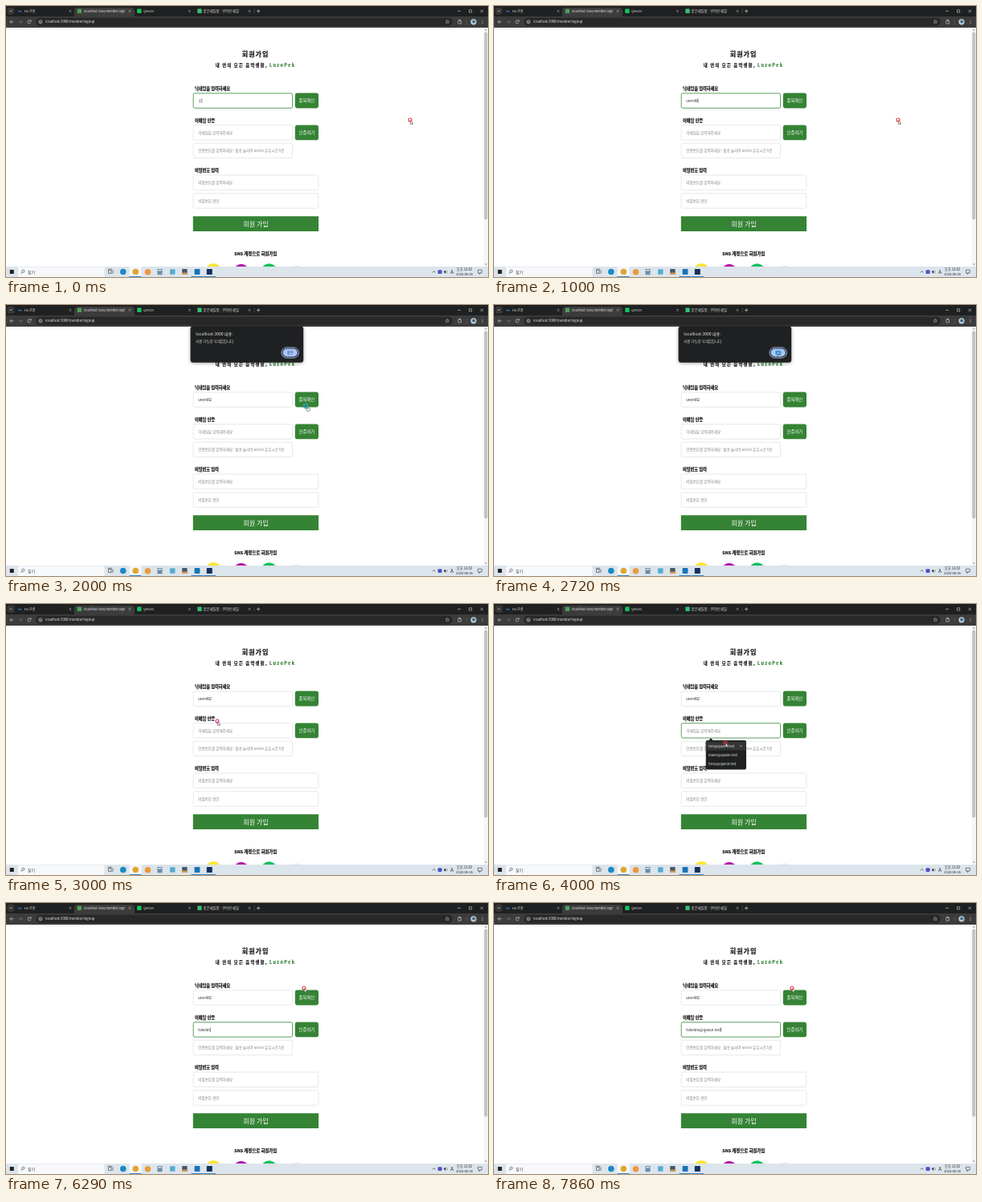
Recreate the animation shown at these times as an HTML page with a canvas. Size 600 px wide and 338 px high, loop 8000 ms.

```html
<!DOCTYPE html>
<html lang="ko">
<head>
<meta charset="utf-8">
<title>회원가입</title>
<style>
html, body { margin: 0; width: 100%; height: 100%; overflow: hidden; background: #fff; }
canvas { display: block; width: 600px; height: 338px; }
</style>
</head>
<body>
<canvas id="stage"></canvas>
<script>
const canvas = document.getElementById('stage');
const dpr = window.devicePixelRatio || 1;
canvas.width = Math.round(600 * dpr);
canvas.height = Math.round(338 * dpr);
const ctx = canvas.getContext('2d');

const LOOP = 8000, RATE = 7;
const FONT = '"Noto Sans CJK KR", "Noto Sans CJK", "Noto Sans", sans-serif';
const GREEN = '#358335', DARK = '#1f2021';
const NICK = 'uren482', MAIL = 'tukolme@qavun.test';

// All times below are ticks of 1/7 s.
const nickKeys = [1, 2, 3, 3, 5, 6, 9];
const mailKeys = [32, 33, 38, 38, 40, 42, 45, 47, 48, 49, 49, 50, 51, 51, 52, 52, 53, 54];
const clicks = [[12, 15], [19, 20], [23, 24]];
const path = [
  [0, 503, 142], [9, 503, 142], [10, 377, 126], [12, 376, 126], [14, 373, 126],
  [15, 373, 126], [18, 354, 60], [20, 354, 60], [21, 263, 146], [23, 272, 157],
  [25, 272, 157], [28, 288, 173], [29, 289, 173], [33, 365, 109], [35, 371, 106]
];

function box(x, y, w, h, r, fill, stroke, lw = 0.8) {
  ctx.beginPath();
  ctx.roundRect(x, y, w, h, r);
  if (fill) { ctx.fillStyle = fill; ctx.fill(); }
  if (stroke) { ctx.strokeStyle = stroke; ctx.lineWidth = lw; ctx.stroke(); }
}

function dot(x, y, r, fill) {
  ctx.beginPath();
  ctx.arc(x, y, r, 0, 7);
  ctx.fillStyle = fill;
  ctx.fill();
}

function ring(x, y, r, color, lw = 0.7, from = 0, to = 7) {
  ctx.beginPath();
  ctx.arc(x, y, r, from, to);
  ctx.strokeStyle = color;
  ctx.lineWidth = lw;
  ctx.stroke();
}

function line(color, lw, ...p) {
  ctx.beginPath();
  for (let i = 0; i < p.length; i += 2) ctx.lineTo(p[i], p[i + 1]);
  ctx.strokeStyle = color;
  ctx.lineWidth = lw;
  ctx.stroke();
}

function poly(fill, stroke, ...p) {
  ctx.beginPath();
  for (let i = 0; i < p.length; i += 2) ctx.lineTo(p[i], p[i + 1]);
  ctx.closePath();
  ctx.fillStyle = fill;
  ctx.fill();
  if (stroke) { ctx.strokeStyle = stroke; ctx.lineWidth = 0.5; ctx.stroke(); }
}

function text(s, x, y, size, color, { weight = 400, align = 'left', gap = 0 } = {}) {
  ctx.font = `${weight} ${size}px ${FONT}`;
  ctx.letterSpacing = gap + 'px';
  ctx.textAlign = align;
  ctx.textBaseline = 'middle';
  ctx.fillStyle = color;
  ctx.fillText(s, x, y);
  if (weight === 900) {
    ctx.strokeStyle = color;
    ctx.lineWidth = 0.2;
    ctx.strokeText(s, x, y);
  }
  return ctx.measureText(s).width;
}

function cross(x, y, r, color, lw = 0.6) {
  line(color, lw, x - r, y - r, x + r, y + r);
  line(color, lw, x + r, y - r, x - r, y + r);
}

function tabs() {
  box(0, 0, 600, 13.5, 0, DARK);
  box(1.5, 1.8, 9, 9, 3, '#373838');
  line('#ddd', 0.7, 4.7, 5.6, 6, 7, 7.3, 5.6);
  box(85, 2, 75, 14, [4, 4, 0, 0], '#3c3c3c');

  line('#3d7fc4', 1, 15, 5.5, 16.6, 7.6, 18, 5.8, 19.5, 8);
  text('H2 콘솔', 22.8, 6.5, 4.1, '#ddd');
  box(88.8, 3.8, 5.2, 5.2, 0.8, '#4aa35a');
  ctx.save();
  ctx.beginPath();
  ctx.rect(96, 0, 52.5, 13);
  ctx.clip();
  text('localhost:3000/member/signup', 97, 6.5, 3.85, '#eee');
  ctx.restore();
  box(163.2, 3.6, 5.4, 5.4, 0.8, '#16c35d');
  text('QAVUN', 171, 6.5, 3.9, '#ddd');
  box(238.3, 3.6, 5.4, 5.4, 0.8, '#35bd78');
  text('받은메일함 : 쿠아번 메일', 245.8, 6.5, 4.35, '#ddd');
  for (const x of [80, 154, 228.5, 303]) cross(x, 6.4, 1.3, '#ccc', 0.55);
  line('#555', 0.6, 309, 3.5, 309, 9.5);
  line('#ccc', 0.7, 312, 6.4, 316.4, 6.4);
  line('#ccc', 0.7, 314.2, 4.2, 314.2, 8.6);

  line('#ddd', 0.6, 562.3, 6.4, 566, 6.4);
  box(576.5, 4.8, 3.2, 3.2, 0.3, null, '#ddd', 0.6);
  cross(592.3, 6.4, 1.7, '#ddd');
}

function toolbar() {
  box(0, 13, 600, 14, 0, '#3c3c3c');
  box(37, 14.7, 519, 10.2, 5.1, '#282828');
  line('#ccc', 0.7, 9.5, 19.8, 4.9, 19.8);
  line('#ccc', 0.7, 7, 17.7, 4.9, 19.8, 7, 21.9);
  line('#777', 0.7, 15.6, 19.8, 20.2, 19.8);
  line('#777', 0.7, 18.1, 17.7, 20.2, 19.8, 18.1, 21.9);
  ring(29, 19.8, 2, '#ccc', 0.7, 0.3, 5.6);
  poly('#ccc', null, 29.4, 19.2, 31.5, 19.2, 31.5, 17.1);
  dot(42.9, 19.8, 3.4, '#3c3c3c');
  ring(42.9, 19.8, 1.8, '#ccc', 0.6);
  line('#ccc', 0.6, 42.9, 19.4, 42.9, 20.9);
  text('localhost:3000/member/signup', 49, 19.8, 4.2, '#eee');

  const star = [];
  for (let i = 0; i < 10; i++) {
    const a = i * Math.PI / 5 - Math.PI / 2, r = i % 2 ? 1.1 : 2.4;
    star.push(549.3 + r * Math.cos(a), 19.8 + r * Math.sin(a));
  }
  poly('#282828', '#ccc', ...star);
  box(562.8, 18.2, 3.8, 3.8, 0.6, null, '#ccc', 0.7);
  dot(564.7, 17.7, 0.9, '#ccc');
  line('#666', 0.6, 573.3, 17, 573.3, 23);
  dot(582, 19.8, 3.6, '#bfd0d8');
  dot(582.2, 19.6, 2, '#3e6f8e');
  for (const y of [18, 19.8, 21.6]) dot(593, y, 0.5, '#ccc');
}

function taskbar() {
  box(0, 325, 600, 13, 0, '#dce4ec');
  box(4.8, 329, 5, 5, 0, '#222');
  box(15, 325.6, 107.5, 12.4, 0, '#f6f8fa');
  ring(21.4, 330.7, 1.6, '#333', 0.6);
  line('#333', 0.7, 20.3, 332, 18.7, 333.8);
  text('찾기', 27, 331.6, 5, '#444');

  box(127.5, 329.6, 3.6, 3.9, 0, null, '#333', 0.6);
  line('#333', 0.6, 126.6, 328.3, 132.2, 328.3);
  line('#333', 0.6, 133, 329.4, 133, 333.8);

  box(153.5, 325, 15.5, 13, 0, '#f3f6f9');
  dot(145.8, 331.5, 3.8, '#1b8ac4');
  dot(161.3, 331.5, 3.8, '#e2a52f');
  dot(176.5, 331.8, 3.8, '#eb9a3c');
  box(188.5, 328, 6, 7.2, 0.6, '#6c8ba4');
  box(189.6, 329, 3.8, 1.5, 0, '#e4eef4');
  box(204, 328.2, 6.5, 6.5, 1, '#55acd0');
  box(219.2, 328, 6.4, 7, 0.8, '#45586a');
  box(219.2, 332.5, 6.4, 2.5, 0.6, '#d8994d');
  box(234.6, 328.1, 6.8, 6.8, 0.8, '#1673b8');
  box(249.8, 328, 7, 7, 0.5, '#16305e');
  for (const x of [153.5, 230.5, 246]) box(x, 337, 15, 1, 0, '#3684c8');

  line('#333', 0.7, 530.9, 332.4, 532.7, 330.6, 534.5, 332.4);
  box(537.6, 329.2, 5, 4.8, 1, '#4a50c8');
  poly('#333', null, 545, 330.8, 546, 330.8, 547.4, 329.5, 547.4, 333.9, 546, 332.6, 545, 332.6);
  ring(547.5, 331.7, 1.9, '#555', 0.5, -0.9, 0.9);
  text('A', 555, 331.8, 6, '#222', { weight: 500, align: 'center' });
  text('오후 12:02', 570.6, 328.6, 4.2, '#222', { align: 'center' });
  text('2024-08-26', 570.6, 334.7, 4, '#222', { align: 'center' });
  box(587.5, 329.2, 4.8, 3.9, 0.3, null, '#333', 0.6);
  line('#333', 0.6, 589, 333.2, 589, 334.6, 590.5, 333.2);
}

function field(y, w, hint, value = '', focus = false, caret = true) {
  box(233.2, y, w, 18.4, 1.8, '#fff', focus ? '#4d934d' : '#dedede', focus ? 0.9 : 0.7);
  const mid = y + 9.2;
  if (!value) return text(hint, 239.3, mid, 4.55, '#808080');
  const end = 239.3 + text(value, 239.3, mid, 4.4, '#222');
  if (focus && caret) line('#111', 0.5, end + 0.4, mid - 2.7, end + 0.4, mid + 2.7);
}

function button(y, label) {
  box(359.8, y, 29.2, 18.8, 2.8, GREEN);
  text(label, 374.4, y + 9.5, 5.4, '#fff', { align: 'center' });
}

const typed = (s, keys, n) => s.slice(0, keys.filter(k => k <= n).length);

function page(n) {
  box(0, 27, 600, 298, 0, '#fff');
  box(594.5, 27, 5.5, 298, 0, '#f6f6f6');
  box(595.3, 32.5, 3.9, 234, 1.9, '#c2c2c2');
  poly('#888', null, 595.9, 30.5, 598.7, 30.5, 597.3, 28.7);
  poly('#888', null, 595.9, 321.5, 598.7, 321.5, 597.3, 323.3);

  const heavy = { weight: 900 };
  text('회원가입', 293.7, 60, 8.1, '#111', { weight: 900, gap: 1 });
  text('내 안의 모든 음악생활,', 260.8, 74, 5.3, '#111', { weight: 900, gap: 1.2 });
  text('LuzoPek', 328, 74, 5.5, GREEN, { weight: 900, gap: 1.35 });

  text('닉네임을 입력하세요', 235, 103, 5.2, '#111', heavy);
  const nick = n ? typed(NICK, nickKeys, n) : 'ㅕ';
  field(108.9, 123.4, '', nick, n < 12);
  button(108.6, '중복확인');

  text('이메일 인증', 235, 142.8, 5.2, '#111', heavy);
  field(148.7, 123.4, '이메일을 입력해주세요', typed(MAIL, mailKeys, n), n >= 24, n !== 54);
  button(148.4, '인증하기');
  field(171.2, 123.4, '인증번호를 입력하세요 : 발송 눌러야 active 유효시간 5분');

  text('비밀번호 입력', 235, 205.3, 5.2, '#111', heavy);
  field(211, 155.7, '비밀번호를 입력하세요');
  field(233.8, 155.7, '비밀번호 확인');
  box(232.8, 262.3, 156.3, 18.7, 0, GREEN);
  text('회원 가입', 311, 271.8, 8.1, '#fff', { align: 'center' });

  text('SNS 계정으로 회원가입', 310.8, 308.5, 5.4, '#111', { weight: 900, align: 'center' });
  dot(258.2, 331, 10, '#fae333');
  dot(292.8, 331, 9.2, '#b51ba9');
  dot(327.5, 331, 9.8, '#10c15c');
  dot(362, 331, 7.8, '#eeeeee');
}

function dialog() {
  ctx.save();
  ctx.shadowColor = 'rgba(0,0,0,.35)';
  ctx.shadowBlur = 4 * dpr;
  ctx.shadowOffsetY = dpr;
  box(229.6, 26.3, 140.6, 45.5, 3.5, DARK);
  ctx.restore();
  text('localhost:3000 내용:', 236.2, 36, 5.1, '#eee');
  text('사용 가능한 닉네임입니다.', 236.2, 45.2, 4.45, '#ddd');
  box(343, 53, 21.4, 13, 6.5, null, '#a8c7fa', 0.9);
  box(344.6, 54.6, 18.2, 9.8, 4.9, '#a8c7fa');
  text('확인', 353.7, 59.5, 4.3, '#183a6b', { align: 'center' });
}

function suggestions() {
  box(263.7, 170, 50.3, 36.5, 2, DARK);
  poly(DARK, null, 267, 170.5, 270, 167.3, 273, 170.5);
  box(263.7, 171.5, 50.3, 11, 0, '#333435');
  ['toru@qavun.test', 'manel@qavun.test', 'toru2@qavun.test'].forEach((s, i) =>
    text(s, 267, 177 + i * 11.2, 4.1, '#eee'));
  cross(307.2, 177, 1.1, '#ccc', 0.5);
}

function pointAt(n) {
  const i = path.findIndex(p => p[0] > n);
  if (i < 0) return path[path.length - 1].slice(1);
  const [t0, x0, y0] = path[i - 1], [t1, x1, y1] = path[i];
  const u = (n - t0) / (t1 - t0), e = u * u * (3 - 2 * u);
  return [x0 + (x1 - x0) * e, y0 + (y1 - y0) * e];
}

function pointer(n) {
  const [x, y] = pointAt(n);
  const down = clicks.some(([a, b]) => n >= a && n <= b);
  const fading = clicks.some(c => n === c[1] + 1);
  const hand = x > 359 && x < 389 && y > 108 && y < 127.5;
  if (hand) {
    box(x + 1.2, y + 2.6, 4.2, 3.8, 1.2, '#fff', '#333', 0.5);
    box(x + 1, y + 0.3, 1.3, 4, 0.6, '#fff', '#333', 0.4);
  } else {
    poly('#fff', '#333', x + 0.4, y + 0.6, x + 0.4, y + 5.5, x + 1.6, y + 4.5,
      x + 2.5, y + 6.1, x + 3.3, y + 5.7, x + 2.5, y + 4.1, x + 3.9, y + 4);
  }
  ring(x, y, down ? 2.5 : 2, down ? '#249fc4' : fading ? '#cc2f91' : '#e0393e', down ? 1.3 : 1.1);
}

function draw(time) {
  const n = Math.floor((time % LOOP) * RATE / 1000);
  ctx.setTransform(dpr, 0, 0, dpr, 0, 0);
  page(n);
  tabs();
  toolbar();
  if (n >= 13 && n < 20) dialog();
  if (n >= 25 && n < 31) suggestions();
  taskbar();
  pointer(n);
}

const start = performance.now();
function loop() {
  draw(performance.now() - start);
  requestAnimationFrame(loop);
}
loop();
</script>
</body>
</html>
```
